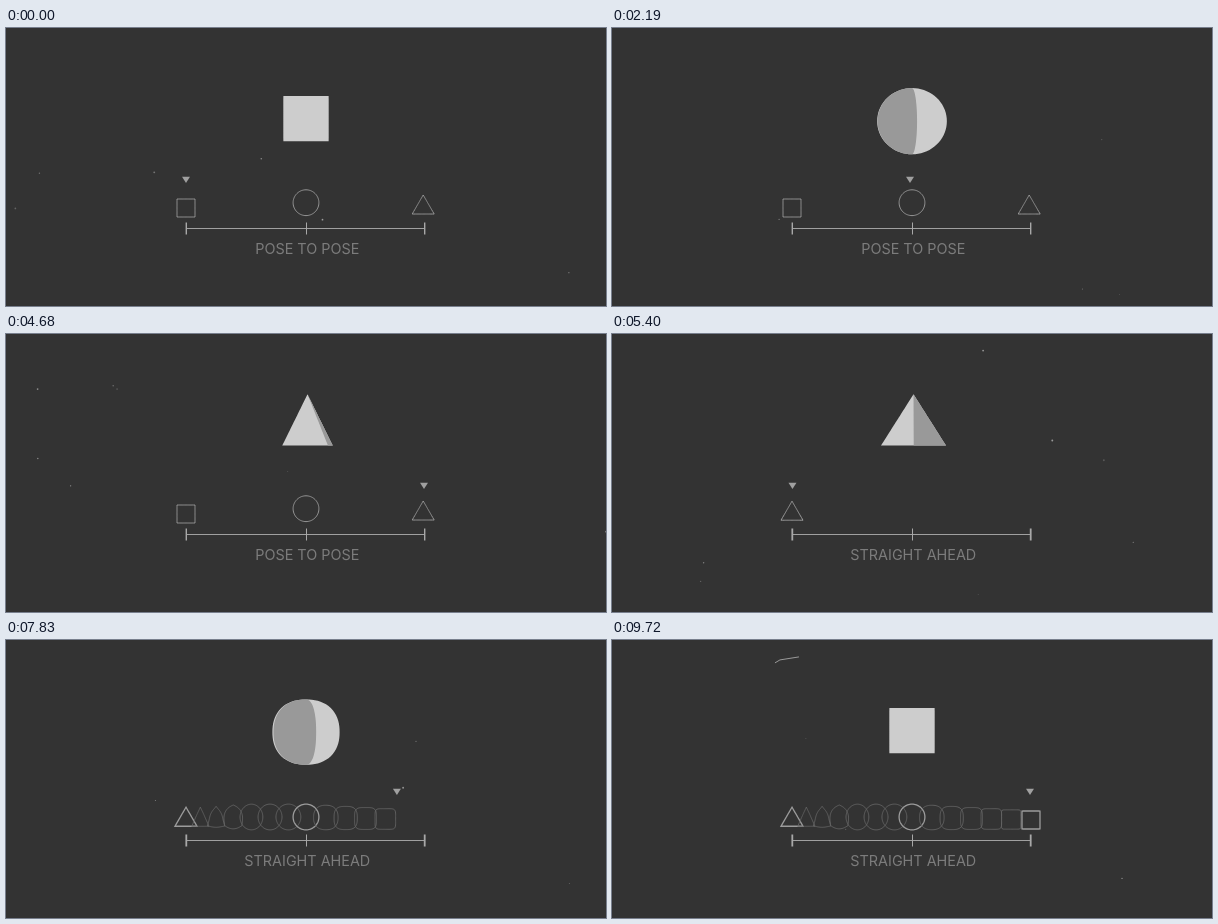
Write an HTML page with a canvas that moves like this. It is 600 px wide and 278 px high and loops after 9780 ms.

```html
<!DOCTYPE html>
<html lang="en">
<head>
<meta charset="utf-8">
<title>Pose to pose, straight ahead</title>
<style>
html, body { margin: 0; width: 100%; height: 100%; overflow: hidden; background: #333; }
canvas { display: block; width: 100vw; height: 100vh; }
</style>
</head>
<body>
<canvas id="stage"></canvas>
<script>
const W = 600, H = 278, LOOP = 9780, SWITCH = 4700, TICK = 30;
const LIGHT = '#cdcdcd', DARK = '#999';
const canvas = document.getElementById('stage');
const ctx = canvas.getContext('2d');
const ratio = window.devicePixelRatio || 1;
canvas.width = W * ratio;
canvas.height = H * ratio;

const RAD = Math.PI / 180;
const { abs, sin, cos, min, max } = Math;
const mix = (a, b, k) => a + (b - a) * k;
const span = (t, from, to) => min(1, max(0, (t - from) / (to - from)));
const ease = (t, from, to) => (1 - cos(Math.PI * span(t, from, to))) / 2;
const bell = (t, mid, width) => Math.exp(-(((t - mid) / width) ** 2));

// Motion of each part over one loop.
const pointerX = t => t < SWITCH
  ? 180 + 120 * ease(t, 998, 2298) + 118 * ease(t, 2588, 3888)
  : 180 + 120 * ease(t, 5350, 6620) + 118 * ease(t, 6950, 8242);
const turnAt = t => -366 * ease(t, 1050, 3900) - 354 * span(t, 5030, 8430);
const squashAt = t => 1 - 0.025 * bell(t, 2190, 250) - 0.07 * bell(t, 6330, 300);
const tiltAt = t => 3.5 * bell(t, 3780, 250);
// 0 square, 1 round, 2 pointed
const formAt = t => ease(t, 998, 2150) + ease(t, 2550, 3700)
  - ease(t, 5950, 7250) - ease(t, 7600, 8620);

// Unit outline that runs from a square (k = 0) to a circle (k = 1).
function squircle(a, k) {
  const p = 2 / max(k, 0.01);
  return (abs(sin(a)) ** p + abs(cos(a)) ** p) ** (-1 / p);
}

// Distance from the centre to a triangle; the angle is measured from straight up.
function triangle(a, half, top) {
  const bottom = half / Math.tan(50 * RAD), h = top + bottom;
  const s = abs(sin(a)), c = cos(a), den = s / half + c / h;
  const side = den > 0 ? top / h / den : Infinity;
  return c < 0 ? min(side, -bottom / c) : side;
}

// Outline distance for a morph stage; size holds square, round, half and top.
const outline = (a, m, size) => m <= 1
  ? mix(size.square, size.round, m) * squircle(a, m)
  : mix(size.round, triangle(a, size.half, size.top), m - 1);

const SOLID = { square: 22.7, round: 34, half: 23, top: 32 };
const ICON = { square: 9, round: 12.9, half: 11, top: 9.8 };

function drawSolid(t) {
  const m = formAt(t), turn = turnAt(t) * RAD, s = squashAt(t);
  const rows = 36, cols = 10;
  const dists = Array.from({ length: rows + 1 }, (_, r) => outline(r / rows * Math.PI, m, SOLID));
  const point = (face, r, c) => {
    const ang = r / rows * Math.PI, local = (c / cols - 0.5) * Math.PI / 2;
    const lon = turn + face * Math.PI / 2 + local;
    const wide = m <= 1 ? squircle(local, m) : mix(1, 1 / cos(local), m - 1);
    return [dists[r] * sin(ang) * wide * sin(lon) / s, -dists[r] * cos(ang) * s];
  };
  const all = new Path2D(), dark = new Path2D();
  for (let face = 0; face < 4; face++)
    for (let r = 0; r < rows; r++)
      for (let c = 0; c < cols; c++) {
        const q = [point(face, r, c), point(face, r, c + 1), point(face, r + 1, c + 1), point(face, r + 1, c)];
        const area = (q[2][0] - q[0][0]) * (q[3][1] - q[1][1]) - (q[2][1] - q[0][1]) * (q[3][0] - q[1][0]);
        if (area <= 1e-6) continue;
        for (const path of face % 2 ? [all, dark] : [all]) {
          q.forEach(([x, y], i) => i ? path.lineTo(x, y) : path.moveTo(x, y));
          path.closePath();
        }
      }
  ctx.save();
  ctx.translate(300 + 1.5 * max(0, m - 1), 90.6 + 1.7 * min(1, m) + 35 * (1 - s));
  ctx.rotate(tiltAt(t) * RAD);
  ctx.fillStyle = LIGHT;
  ctx.fill(all);
  ctx.fillStyle = DARK;
  ctx.fill(dark);
  ctx.restore();
}

function line(points, color, width, close) {
  ctx.beginPath();
  points.forEach(([x, y], i) => i ? ctx.lineTo(x, y) : ctx.moveTo(x, y));
  if (close) ctx.closePath();
  ctx.strokeStyle = color;
  ctx.lineWidth = width;
  ctx.stroke();
}

function drawIcon(x, y, m, color, width, narrow = 1) {
  const points = [];
  for (let d = 0; d < 360; d += 5) {
    const a = d * RAD, r = outline(a, m, ICON);
    points.push([x + narrow * r * sin(a), y - r * cos(a)]);
  }
  line(points, color, width, true);
}

function drawTimeline(label, endWidth) {
  const tick = (x, width) => line([[x, 194.5], [x, 206.5]], '#a8a8a8', width);
  line([[180, 200.5], [419, 200.5]], '#a0a0a0', 1.2);
  tick(180.3, endWidth);
  tick(300.5, 1);
  tick(418.7, endWidth);
  ctx.font = '400 14.4px Inter, "Open Sans", sans-serif';
  ctx.textAlign = 'center';
  ctx.fillStyle = '#7c7c7c';
  ctx.fillText(label, 301.3, 226.4);
}

function drawPointer(x) {
  ctx.beginPath();
  ctx.moveTo(x - 4, 148.7);
  ctx.lineTo(x + 4, 148.7);
  ctx.lineTo(x, 155);
  ctx.fillStyle = '#a0a0a0';
  ctx.fill();
}

function drawPose() {
  drawIcon(180, 180, 0, '#959595', 1);
  drawIcon(300, 174.7, 1, '#959595', 1);
  drawIcon(417.2, 176.8, 2, '#959595', 1);
  drawTimeline('POSE TO POSE', 1.4);
}

// Triangle to circle in seven steps, then circle to square in six.
function drawStraight(x) {
  for (let i = 0; i <= 13; i++) {
    const k = i / 7, late = (i - 7) / 6, first = i < 7;
    const sx = first ? 180 + 120 * k - 7.5 * sin(Math.PI * k) * (1 - k) : 300 + 119 * late;
    if (i && x < min(sx + 6, 417.5)) break;
    const m = first ? 2 - ease(i, 0.7, 4.3) : 1 - late;
    const y = 177 + 3 * max(0, late);
    if (i === 0 || i === 7 || i === 13) drawIcon(sx, y, m, '#9c9c9c', x > 190 ? 1.3 : 1);
    else drawIcon(sx, y, m, '#666', 0.85, first ? 0.75 + k / 4 : 1);
  }
  drawTimeline('STRAIGHT AHEAD', 1.8);
}

function random(seed) {
  let s = Math.imul(seed, 2654435761) >>> 0;
  return () => {
    s = (s + 0x6D2B79F5) >>> 0;
    let r = Math.imul(s ^ s >>> 15, s | 1);
    r ^= r + Math.imul(r ^ r >>> 7, r | 61);
    return ((r ^ r >>> 14) >>> 0) / 4294967296;
  };
}

// Film dust: new specks on every tick and now and then a short hair.
function drawDust(t) {
  const rnd = random(Math.floor(t / TICK) + 1);
  for (let n = 2 + Math.floor(rnd() * 8); n > 0; n--) {
    ctx.fillStyle = `rgba(205,205,205,${0.2 + rnd() * 0.5})`;
    ctx.beginPath();
    ctx.arc(rnd() * W, rnd() * H, 0.4 + rnd() * 0.6, 0, 7);
    ctx.fill();
  }
  if (rnd() < 0.06) {
    const x = rnd() * W, y = rnd() * H;
    line([[x, y], [x + 5, y - 3], [x + 24, y - 6]], '#999', 1);
  }
}

function draw(t) {
  ctx.setTransform(ratio, 0, 0, ratio, 0, 0);
  ctx.fillStyle = '#333';
  ctx.fillRect(0, 0, W, H);
  const x = pointerX(t);
  drawSolid(t);
  if (t < SWITCH) drawPose();
  else drawStraight(x);
  drawPointer(x);
  drawDust(t);
}

const start = performance.now();
function frame() {
  draw((performance.now() - start) % LOOP);
  requestAnimationFrame(frame);
}
frame();
</script>
</body>
</html>
```
